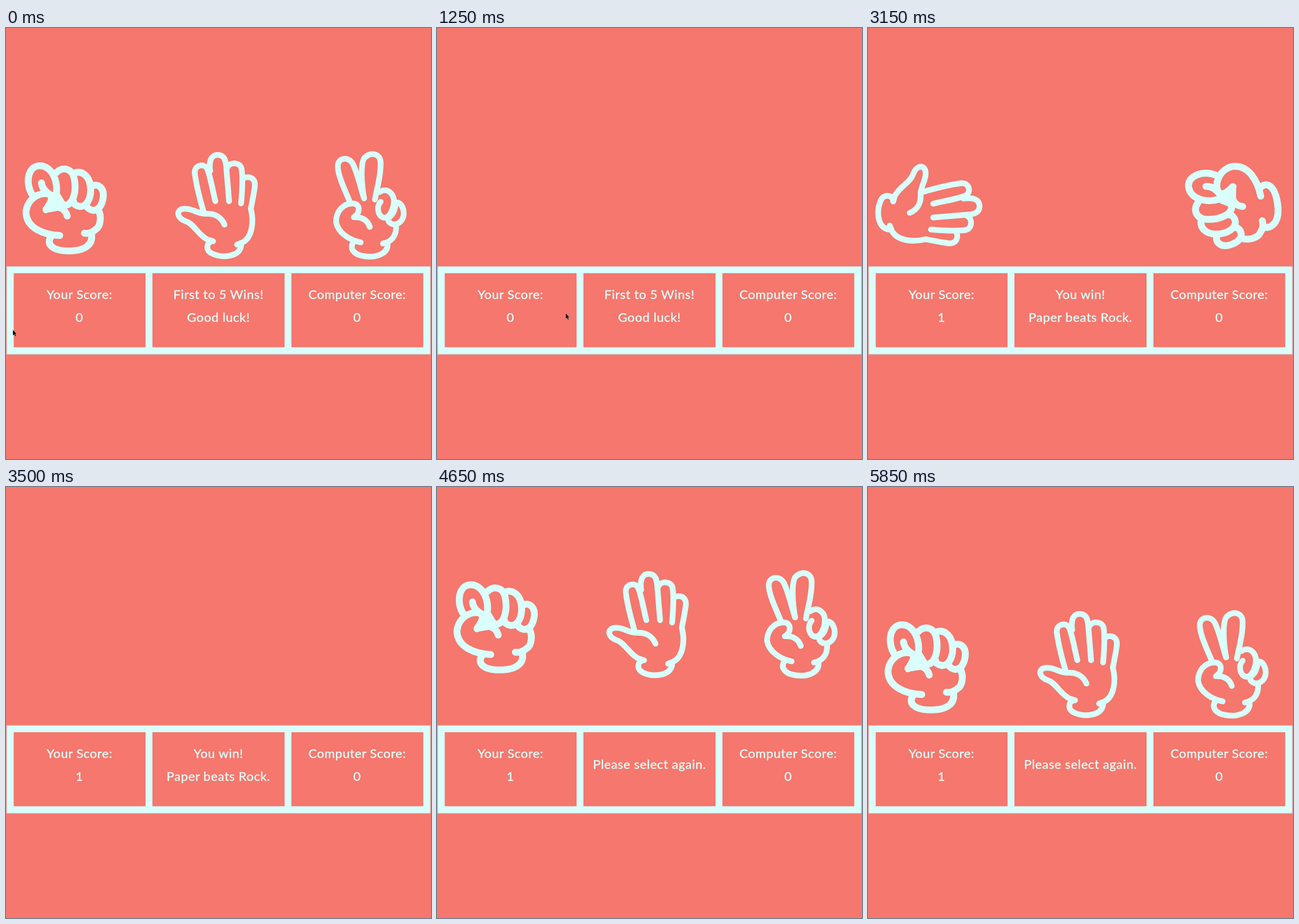
An HTML page that plays this animation: 743x754 px, repeating every 5900 ms.

```html
<!DOCTYPE html>
<html lang="en">
<head>
<meta charset="utf-8">
<title>Rock Paper Scissors</title>
<style>
  html, body { margin: 0; height: 100%; overflow: hidden; background: #f5776d; }
  svg { display: block; width: 743px; height: 754px; }
  .hand { fill: none; stroke: #dafefb; stroke-width: 10; stroke-linecap: round; stroke-linejoin: round; }
  #rock { stroke-width: 12; }
  text {
    font: 22px Lato, sans-serif; letter-spacing: .6px; text-anchor: middle;
    fill: #dafefb; stroke: #dafefb; stroke-width: .4px;
  }
</style>
</head>
<body>
<svg viewBox="0 0 743 754">
  <defs>
    <g id="rock" class="hand">
      <path d="M46 292C33 272 38 241 59 241C79 241 93 266 87 296"/>
      <path d="M62 271C63 280 68 287 80 293"/>
      <path d="M70 318C76 308 84 298 77 292C64 284 36 297 35 323C36 350 66 362 94 363"/>
      <path d="M70 317C90 308 104 316 107 329"/>
      <path d="M71 317L88 291L101 312Z" fill="#dafefb"/>
      <path d="M88 253C98 242 115 245 119 262C124 285 118 307 105 310C97 311 92 303 91 296"/>
      <path d="M117 255C130 247 148 257 148 284C148 302 138 314 128 312C122 311 117 307 118 303"/>
      <path d="M149 278C158 270 172 278 170 296C168 312 160 320 152 319C146 318 140 314 141 308"/>
      <path d="M161 318C168 329 165 348 157 352C151 358 144 360 137 359"/>
      <path d="M79 365C70 376 78 390 110 390C142 390 153 376 149 359"/>
    </g>
    <g id="paper" class="hand">
      <path d="M382 344C377 332 366 324 350 325C336 326 322 313 307 317C297 321 300 333 314 338C328 342 336 362 352 370L362 373"/>
      <path d="M345 320C338 296 332 270 330 254C329 239 347 236 352 247C358 262 362 288 366 303"/>
      <path d="M357 250C354 231 360 222 370 222C382 222 384 232 385 242L390 303"/>
      <path d="M387 244C391 234 410 234 412 247C414 262 413 285 411 307"/>
      <path d="M414 264C421 258 437 260 435 277C433 292 430 306 428 316C434 340 430 366 414 375L404 379"/>
      <path d="M358 374C350 377 349 390 361 395C380 403 408 400 411 381"/>
    </g>
    <g id="scissors" class="hand">
      <path d="M601 304C592 282 580 258 580 241C581 227 598 224 606 237C614 252 620 280 626 298"/>
      <path d="M626 298C621 270 620 238 626 228C636 216 656 218 655 238C655 262 648 282 645 300"/>
      <path d="M655 304C647 313 650 331 662 332C672 331 678 314 678 304C679 290 666 278 653 287"/>
      <path d="M681 305C692 304 698 320 694 332C690 342 680 346 673 342C668 339 668 336 668 332C676 328 680 318 681 308"/>
      <path d="M682 346C683 362 675 374 659 377"/>
      <path d="M636 348C632 336 622 330 608 331C620 324 620 307 606 307C588 307 577 322 577 339C580 358 600 371 620 375"/>
      <path d="M608 374C600 384 606 396 625 399C648 403 669 394 667 377"/>
    </g>
  </defs>

  <path d="M1 417H742V571H1Z" fill="#dafefb" stroke="#d0aea9"/>
  <path d="M13.5 429H244V558.5H13.5ZM256 429H487V558.5H256ZM499 429H729.5V558.5H499Z" fill="#f5776d"/>
  <text x="128.5" y="473.5">Your Score:</text>
  <text x="128.5" y="513.5" id="score"></text>
  <text x="371.5" y="473.5" id="line1"></text>
  <text x="371.5" y="513.5" id="line2"></text>
  <text x="614" y="473.5">Computer Score:</text>
  <text x="614" y="513.5">0</text>

  <g id="choices">
    <use href="#rock"/><use href="#paper"/><use href="#scissors"/>
  </g>
  <g id="round">
    <use href="#paper" transform="translate(106 309.5) rotate(90) translate(-368 -311)"/>
    <use href="#rock" transform="translate(641 310) rotate(-9) matrix(0 1 1 0 0 0) translate(-102.5 -315.5)"/>
  </g>
  <path id="cursor" d="M0 0V10L2.3 8L4 11.6L5.6 10.8L4 7.4H6.6Z" stroke="#fff" stroke-opacity=".45" stroke-width=".6"/>
</svg>

<script>
const LOOP = 5900, TICK = 50, TRAVEL = 1190;
const $ = id => document.getElementById(id);
const clamp = v => Math.min(1, Math.max(0, v));

// Same curve as the CSS "ease" keyword
function ease(x) {
  const bez = (s, a, b) => 3 * s * (1 - s) ** 2 * a + 3 * s * s * (1 - s) * b + s ** 3;
  let lo = 0, hi = 1;
  for (let i = 0; i < 24; i++) {
    const mid = (lo + hi) / 2;
    if (bez(mid, .25, .25) < x) lo = mid; else hi = mid;
  }
  return bez(lo, .1, 1);
}

const leave = (t, start) => -TRAVEL * ease(clamp((t - start) / 1000));
const enter = (t, start) => -TRAVEL - leave(t, start);

function place(id, y) {
  $(id).setAttribute('transform', `translate(0 ${y.toFixed(2)})`);
}

// time, x, y of the pointer tip
const pointer = [[0, 12, 528], [50, 12, 528], [550, 366, 318], [700, 366, 318], [1250, 225, 499], [1500, 28, 541]];

function movePointer(t) {
  const i = pointer.findIndex(p => p[0] > t);
  $('cursor').style.display = i < 0 ? 'none' : '';
  if (i < 0) return;
  const [t0, x0, y0] = pointer[i - 1], [t1, x1, y1] = pointer[i];
  const k = (1 - Math.cos(Math.PI * (t - t0) / (t1 - t0))) / 2;
  $('cursor').setAttribute('transform', `translate(${x0 + (x1 - x0) * k} ${y0 + (y1 - y0) * k})`);
}

function draw(t) {
  place('choices', t < 2500 ? leave(t, 620) : enter(t, 3949));
  place('round', t < 2500 ? enter(t, 1309) : leave(t, 3178));
  const stage = t < 1300 ? 0 : t < 3750 ? 1 : 2;
  $('score').textContent = stage ? '1' : '0';
  $('line1').textContent = ['First to 5 Wins!', 'You win!', 'Please select again.'][stage];
  $('line1').setAttribute('y', stage === 2 ? 493 : 473.5);
  $('line2').textContent = ['Good luck!', 'Paper beats Rock.', ''][stage];
  movePointer(t);
}

function frame() {
  draw(Math.floor(performance.now() % LOOP / TICK) * TICK);
  requestAnimationFrame(frame);
}
frame();
</script>
</body>
</html>
```
